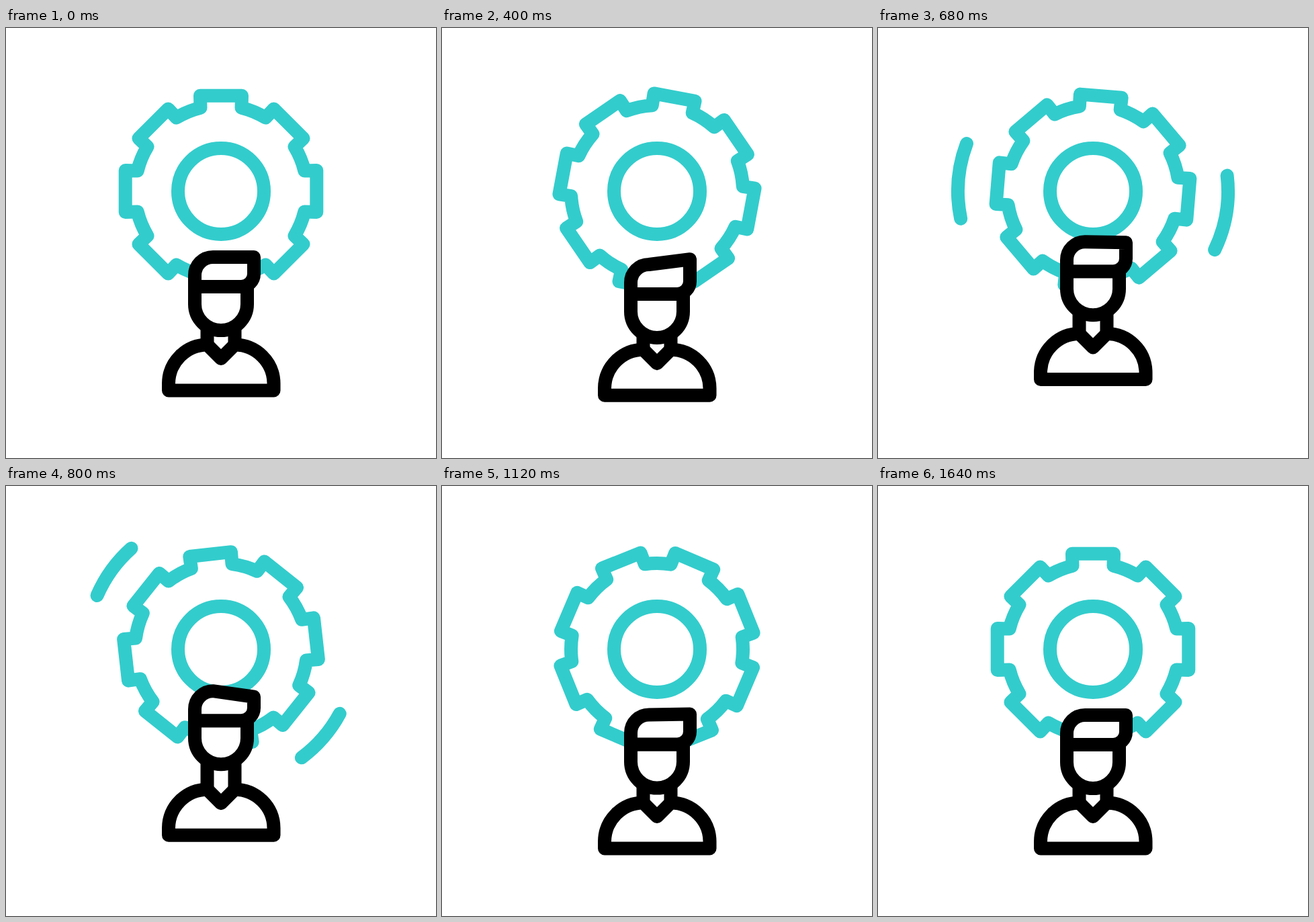
An HTML page for the animation above (1.68 s loop, 640x640 px).

```html
<!DOCTYPE html>
<html lang="en">
<head>
<meta charset="utf-8">
<title>Person and gear</title>
<style>
  html, body { margin: 0; height: 100%; overflow: hidden; background: #fff; }
  svg { display: block; width: 100%; height: 100%; }
  path, circle { fill: none; stroke-width: 20; stroke-linecap: round; stroke-linejoin: round; }
  .teal { stroke: #33cccc; }
  .ink { stroke: #000; }
  .solid { fill: #fff; }
</style>
</head>
<body>
<svg viewBox="0 0 640 640">
  <g class="teal">
    <path id="gear"/>
    <circle cx="320" cy="243" r="64"/>
    <path id="arcR"/>
    <path id="arcL"/>
  </g>
  <g class="ink">
    <path id="neck"/>
    <g id="body">
      <path class="solid" d="M299.5 471.5A58 58 0 0 0 242 529V539.5H398.5V529A58 58 0 0 0 340.5 471.5L320 492Z"/>
    </g>
    <g id="head">
      <path class="solid" d="M281 385V411A39 39 0 0 0 359 411V385Z"/>
      <path class="solid" id="hair"/>
    </g>
  </g>
</svg>
<script>
const LOOP = 1680, STEP = 40, CX = 320, CY = 243;
const el = id => document.getElementById(id);
const [gear, arcR, arcL, neck, body, head, hair] =
  ['gear', 'arcR', 'arcL', 'neck', 'body', 'head', 'hair'].map(el);

const clamp = u => Math.min(1, Math.max(0, u));
const smooth = u => u * u * (3 - 2 * u);
const ramp = (t, a, b) => clamp((t - a) / (b - a));

// Cubic ease in and out with handles of length a
function strongEase(x, a) {
  let lo = 0, hi = 1;
  for (let i = 0; i < 30; i++) {
    const s = (lo + hi) / 2, r = 1 - s;
    const at = 3 * a * s * r * r + 3 * (1 - a) * s * s * r + s * s * s;
    if (at < x) lo = s; else hi = s;
  }
  return smooth((lo + hi) / 2);
}

// Keys are [time, value], eased between neighbours
function track(keys, t) {
  let v = keys[0][1];
  for (let i = 1; i < keys.length; i++) {
    const [t0, v0] = keys[i - 1], [t1, v1] = keys[i];
    if (t >= t0) v = v0 + (v1 - v0) * smooth(ramp(t, t0, t1));
  }
  return v;
}

const BODY = [[40, 0], [430, 7.3], [760, -20.6], [1110, 0]];
const HEAD = [[40, 0], [480, 12], [785, -36], [1145, 0]];
const TIP = [[140, 0], [500, -9.5], [830, 9], [1100, -1], [1200, 0]];

const polar = deg => {
  const a = deg * Math.PI / 180;
  return `${CX + 201 * Math.cos(a)} ${CY + 201 * Math.sin(a)}`;
};

function gearPath() {
  let d = '';
  for (let i = 0; i < 8; i++) {
    const a = i * Math.PI / 4, c = Math.cos(a), s = Math.sin(a);
    const at = (x, y) => `${CX + x * c - y * s} ${CY + x * s + y * c}`;
    d += i ? `A128 128 0 0 1 ${at(-30.5, -124.3)}` : `M${at(-30.5, -124.3)}`;
    d += `L${at(-31, -142.3)}L${at(31, -142.3)}L${at(30.5, -124.3)}`;
  }
  return d + `A128 128 0 0 1 ${CX - 30.5} ${CY - 124.3}Z`;
}

function drawArc(path, start, from, to) {
  const SPAN = 103;
  path.setAttribute('d', to - from < 0.002 ? '' :
    `M${polar(start + SPAN * from)}A201 201 0 0 1 ${polar(start + SPAN * to)}`);
}

function draw(t) {
  const turn = 180 * strongEase(ramp(t, 50, 1590), 0.635);
  gear.setAttribute('transform', `rotate(${turn} ${CX} ${CY})`);

  const lead = smooth(ramp(t, 418, 818)), tail = smooth(ramp(t, 455, 966));
  drawArc(arcR, -49, tail, lead);
  drawArc(arcL, 126, tail, lead);

  const by = track(BODY, t), hy = track(HEAD, t), tip = track(TIP, t);
  body.setAttribute('transform', `translate(0 ${by})`);
  head.setAttribute('transform', `translate(0 ${hy})`);
  neck.setAttribute('d', [299.5, 340.5].map(x => `M${x} ${435 + hy}V${471.5 + by}`).join(''));
  hair.setAttribute('d',
    `M281 385V368Q281 341 308 341L369 ${341 + tip}V366A19 19 0 0 1 350 385Z`
      .replace('Q281 341 308 341', 'A27 27 0 0 1 308 341'));
}

gear.setAttribute('d', gearPath());
const begin = performance.now();
function tick() {
  const t = (performance.now() - begin) % LOOP;
  draw(Math.floor(t / STEP) * STEP);
  requestAnimationFrame(tick);
}
tick();
</script>
</body>
</html>
```
